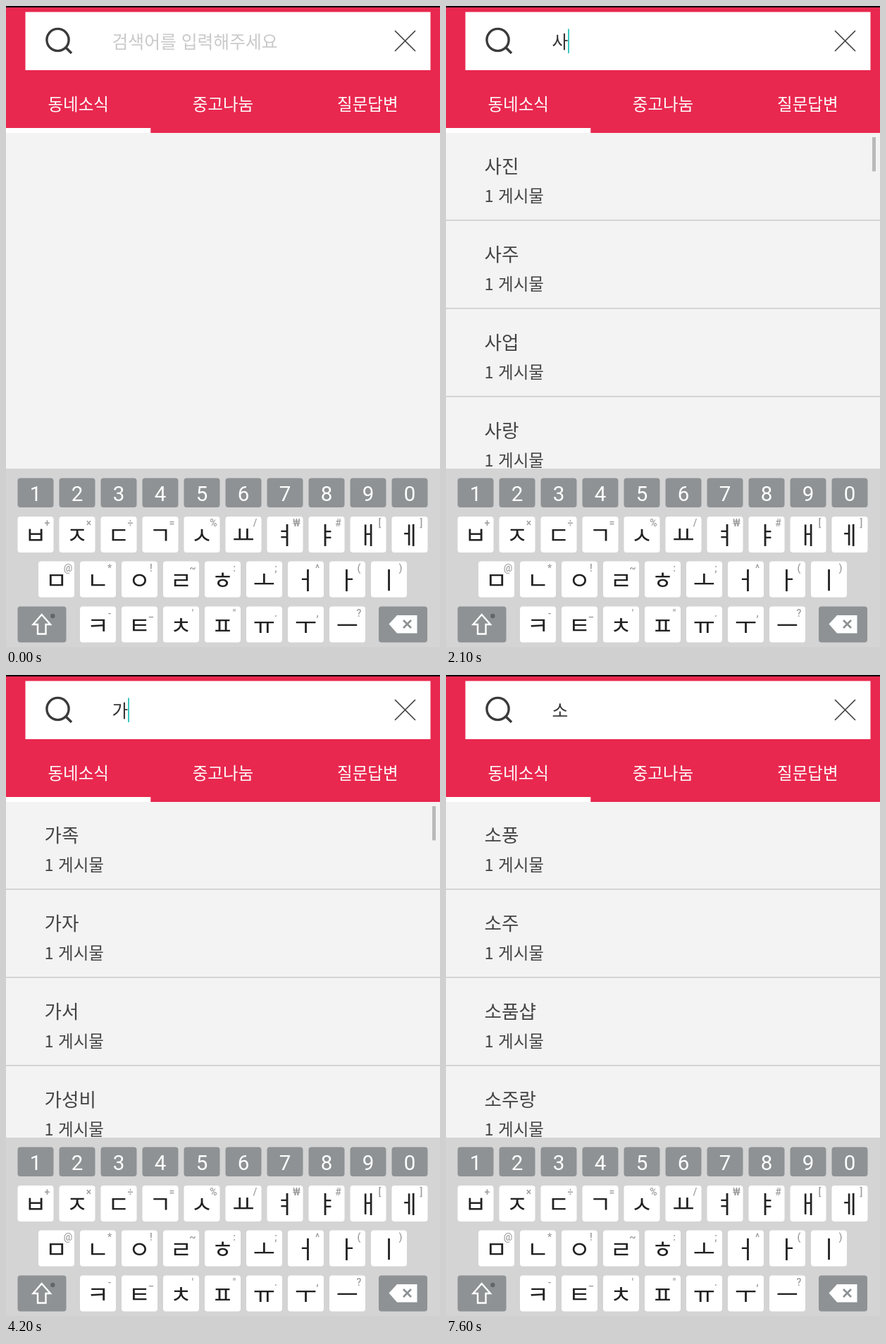
Write an HTML page that moves like this. It is 616 by 909 pixels and loops after 8000 ms.

```html
<!DOCTYPE html>
<html lang="ko">
<head>
<meta charset="utf-8">
<title>검색</title>
<style>
  html, body { margin: 0; width: 616px; height: 909px; overflow: hidden; }
  svg { display: block; }
  text { font-family: "Noto Sans CJK KR", "Noto Sans CJK", sans-serif; white-space: pre; }
  .mid { text-anchor: middle; }
  .tab { font-size: 23.5px; font-weight: 300; fill: #fff; }
  .field { font-size: 24.8px; font-weight: 300; fill: #333; }
  .hint { fill: #c9c9c9; }
  .caret { fill: #3cc8c1; }
  .title { font-size: 26.6px; fill: #444; }
  .count { font-size: 23.5px; fill: #444; }
  .none { font-size: 26.8px; font-weight: 300; fill: #777; }
  .ticker { font-size: 24px; fill: #fff; }
  .digit { font: 400 29.5px Roboto, sans-serif; fill: #fff; }
  .jamo { font-size: 34px; font-weight: 500; fill: #222; }
  .alt { font: 500 14px Roboto, "Noto Sans", sans-serif; fill: #9c9c9c; }
  .dark { fill: #8e9294; }
  .light { fill: #fff; }
  .down { fill: #b2b4b5; }
</style>
</head>
<body>
<svg id="stage" width="616" height="909" viewBox="0 0 616 909"></svg>
<script>
const LOOP = 8000;
const stage = document.getElementById('stage');

const rect = (x, y, w, h, attrs) => `<rect x="${x}" y="${y}" width="${w}" height="${h}" ${attrs}/>`;
const text = (x, y, cls, str) => `<text x="${x}" y="${y}" class="${cls}">${str}</text>`;
// Group visible only during the given "from-to" spans, in ms.
const during = (spans, body) => `<g data-on="${spans}">${body}</g>`;

function results(spans, words) {
  const rows = words.map((word, i) => {
    const y = i * 125;
    return text(54.5, 237 + y, 'title', word) +
      text(54.5, 278 + y, 'count', '1 게시물') +
      rect(0, 303 + y, 616, 1.5, 'fill="#cbcbcb"');
  });
  return during(spans, rows.join(''));
}

function emptyResult(spans) {
  return during(spans,
    rect(0, 180, 616, 476, 'fill="#fff"') +
    text(54.5, 252.5, 'none', '검색 결과 없음') +
    rect(0, 303, 616, 1.5, 'fill="#e6e6e6"'));
}

function header() {
  const tabs = ['동네소식', '중고나눔', '질문답변'];
  return rect(0, 0, 616, 180, 'fill="#e8284f"') +
    rect(0, 0, 616, 2, 'fill="#000"') +
    rect(27.5, 8.5, 575, 82.5, 'fill="#fff"') +
    '<g fill="none" stroke="#3b3b3b"><circle cx="73.5" cy="48" r="15.6" stroke-width="3.4"/>' +
    '<path d="M84.5 58.5L93 67" stroke-width="3.6"/>' +
    '<path d="M552 35L581 64M581 35L552 64" stroke-width="1.6"/></g>' +
    tabs.map((name, i) => text(102.7 + i * 205.3, 148, 'tab mid', name)).join('') +
    rect(0, 173, 205.3, 7, 'fill="#fff"');
}

function field() {
  const typed = (spans, str, cls = '') => during(spans, text(150.5, 59.6, 'field ' + cls, str));
  const caret = (spans, x) => during(spans, rect(x, 32.5, 2, 34.5, 'class="caret"'));
  return typed('0-900 2700-4000 5300-6800', '검색어를 입력해주세요', 'hint') +
    typed('900-1100 6800-7000', 'ㅅ') +
    typed('1100-2700', '사') +
    typed('4000-4100', 'ㄱ') +
    typed('4100-5300', '가') +
    typed('7000-8000', '소') +
    caret('100-600 2700-3200 3700-4000 5300-5800 6300-6800', 151) +
    caret('900-1600 2100-2600 4000-4600 5100-5300 6800-7600', 173);
}

const presses = { 'ㅅ': '800-900', 'ㄱ': '3900-4000', 'ㅏ': '1000-1100 4000-4100' };

function keyRow(x0, y, jamo, alts) {
  return [...jamo].map((ch, i) => {
    const x = x0 + i * 59;
    const key = cls => rect(x, y, 51, 51, `rx="4" class="${cls}"`);
    return key('light') +
      (presses[ch] ? during(presses[ch], key('down')) : '') +
      text(x + 25.5, y + 39, 'jamo mid', ch) +
      text(x + 42, y + 14, 'alt mid', alts[i]);
  }).join('');
}

function keyboard() {
  const digits = [...'1234567890'].map((d, i) =>
    rect(16.5 + i * 59, 669.5, 51, 41.5, 'rx="4" class="dark"') +
    text(42 + i * 59, 701.5, 'digit mid', d)).join('');
  return rect(0, 656, 616, 253, 'fill="#d4d4d4"') + digits +
    keyRow(16.5, 724, 'ㅂㅈㄷㄱㅅㅛㅕㅑㅐㅔ', '+×÷=%/₩#[]') +
    keyRow(46, 787.5, 'ㅁㄴㅇㄹㅎㅗㅓㅏㅣ', '@*!~:;^()') +
    keyRow(105, 851.5, 'ㅋㅌㅊㅍㅠㅜㅡ', '-_\'".,?') +
    rect(16.5, 851.5, 69, 51, 'rx="4" class="dark"') +
    '<path d="M50.7 863L63 877H56.5V890.5H45V877H38.5Z" fill="none" stroke="#fff" stroke-width="2.4"/>' +
    '<circle cx="66.3" cy="865" r="3.2" fill="#626668"/>' +
    rect(529, 851.5, 69, 51, 'rx="4" class="dark"') +
    '<path d="M543.5 876.5L555 864H583.5V889.5H555Z" fill="#fff"/>' +
    '<path d="M564 871L575 882M575 871L564 882" stroke="#8e9294" stroke-width="2.8"/>';
}

const ticker = (spans, y) => during(spans, text(16, y, 'ticker', 'W2 탐도 그림 시기'));

stage.innerHTML =
  rect(0, 0, 616, 909, 'fill="#f3f3f3"') +
  results('1200-2700', ['사진', '사주', '사업', '사랑']) +
  results('4200-5300', ['가족', '가자', '가서', '가성비']) +
  results('7100-8000', ['소풍', '소주', '소품샵', '소주랑']) +
  during('1200-2700 4200-5200', rect(605, 186, 5, 48.5, 'fill="#b9b9b9"')) +
  emptyResult('2700-4200 5300-7100') +
  header() +
  ticker('900-1000 3400-3500', 4) +
  ticker('3500-3600', 1) +
  field() +
  keyboard();

const parts = [...stage.querySelectorAll('[data-on]')].map(el => ({
  el,
  spans: el.dataset.on.split(' ').map(s => s.split('-').map(Number))
}));

const start = performance.now();
function draw() {
  const t = (performance.now() - start) % LOOP;
  for (const { el, spans } of parts) {
    const on = spans.some(([from, to]) => t >= from && t < to);
    el.style.display = on ? '' : 'none';
  }
  requestAnimationFrame(draw);
}
draw();
</script>
</body>
</html>
```
